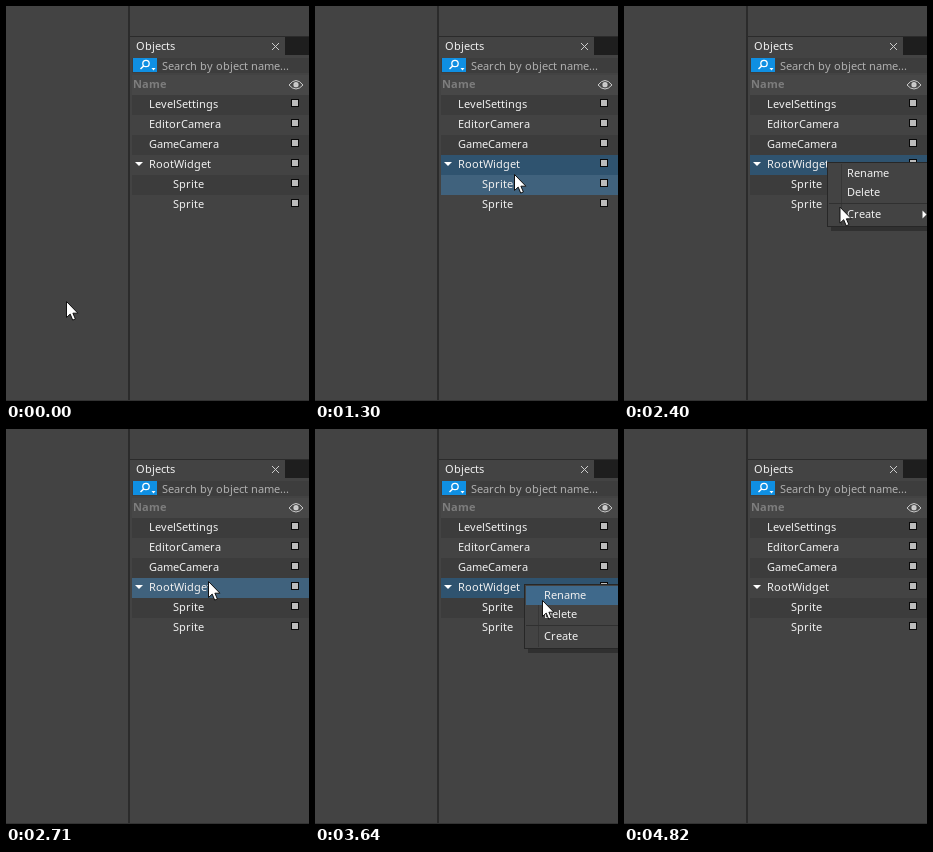
These frames come from a looping animation (303x395 px, 5320 ms). An HTML page with a canvas:

```html
<!DOCTYPE html>
<html>
<head>
<meta charset="utf-8">
<style>
html, body { margin: 0; height: 100%; overflow: hidden; background: #434343; }
canvas { display: block; }
</style>
</head>
<body>
<canvas id="stage" width="303" height="395"></canvas>
<script>
const ctx = document.getElementById('stage').getContext('2d');
const LOOP = 5320, SELECT_TIME = 520, FADE_START = 4600, FADE_TIME = 220;
const HOVER_LAG = 20, SUBMENU_DELAY = 100;
const ROW_TOP = 89, ROW_HEIGHT = 20, ROOT = 3, ITEM_HEIGHT = 19;
const ROWS = ['LevelSettings', 'EditorCamera', 'GameCamera', 'RootWidget', 'Sprite', 'Sprite'];
const MAIN_ITEMS = ['Rename', 'Delete', '-', 'Create'];
const SUB_ITEMS = ['Camera', 'Light', '-', 'Model', 'Particle System', 'Sound Source', '-',
  'Sprite', 'Text', 'Button', 'Widget'];

// Each visit opens the menu at x, y, reaches "Create", then enters the submenu
const VISITS = [
  { x: 171, y: 152, open: 530, reach: 760, close: 1080, drop: 62 },
  { x: 199, y: 161, open: 1430, reach: 1540, close: 1810 },
  { x: 203, y: 156, open: 2160, reach: 2460, close: 2560 },
  { x: 202, y: 152, open: 2910, reach: 3040, close: 3330 },
  { x: 209, y: 155, open: 3510, reach: 3760, close: 4820, wait: 300 }
];

const key = (t, x, y) => ({ t, x, y });

function visitKeys({ x, y, open, reach, close, drop = 50, wait = 120 }) {
  const leave = Math.min(reach + wait, close);
  const create = [x + 14, y + drop], item = [x - 85, y + 114];
  const keys = [key(open - 70, x, y), key(open + 10, x, y), key(reach, ...create), key(leave, ...create)];
  if (leave < close) keys.push(key(leave + 130, ...item), key(leave + 180, ...item));
  return keys;
}

// Pointer stops between and during the visits
const path = [
  key(0, 60, 295), key(230, 60, 295), key(1300, 199, 168),
  key(1900, 203, 212), key(2000, 203, 212), key(2030, 202, 181),
  key(2700, 202, 152), key(3640, 227, 171),
  key(4570, 302, 170), key(4600, 302, 170), key(4800, 304, 44),
  ...VISITS.flatMap(visitKeys)
].sort((a, b) => a.t - b.t);

function pointerAt(t) {
  const next = path.findIndex(p => p.t > t);
  if (next === 0) return path[0];
  if (next < 0) return { x: 400, y: 44 };
  const a = path[next - 1], b = path[next];
  const k = (t - a.t) / (b.t - a.t), s = k * k * (3 - 2 * k);
  return { x: a.x + (b.x - a.x) * s, y: a.y + (b.y - a.y) * s };
}

function rect(x, y, w, h, color) {
  ctx.fillStyle = color;
  ctx.fillRect(x, y, w, h);
}

// Letters advance by whole pixels, as in hinted interface text
function text(str, x, y, color = '#f0f0f0', weight = 'normal') {
  ctx.font = weight + ' 11px "Noto Sans", sans-serif';
  ctx.fillStyle = color;
  for (const letter of str) {
    ctx.fillText(letter, x, y);
    x += Math.round(ctx.measureText(letter).width);
  }
}

function shape(points, fill, stroke) {
  ctx.beginPath();
  for (let i = 0; i < points.length; i += 2) ctx.lineTo(points[i], points[i + 1]);
  ctx.closePath();
  ctx.fillStyle = fill;
  ctx.fill();
  if (stroke) {
    ctx.strokeStyle = stroke;
    ctx.lineWidth = 1;
    ctx.stroke();
  }
}

function line(x1, y1, x2, y2, color, width) {
  ctx.strokeStyle = color;
  ctx.lineWidth = width;
  ctx.beginPath();
  ctx.moveTo(x1, y1);
  ctx.lineTo(x2, y2);
  ctx.stroke();
}

function ring(x, y, r, color, width) {
  ctx.strokeStyle = color;
  ctx.lineWidth = width;
  ctx.beginPath();
  ctx.arc(x, y, r, 0, 7);
  ctx.stroke();
}

function drawPanel() {
  rect(0, 0, 303, 395, '#434343');
  rect(122, 0, 2, 395, '#2b2b2b');
  rect(124, 30, 179, 1, '#2b2b2b');
  rect(279, 31, 24, 18, '#1e1e1e');
  rect(0, 394, 303, 1, '#333');
  text('Objects', 130, 44);
  line(266, 37, 273, 44, '#ccc', 1);
  line(273, 37, 266, 44, '#ccc', 1);

  rect(126, 52, 177, 15, '#3d3d3d');
  rect(127, 52, 24, 14, '#0f8fe2');
  ring(140, 57.5, 3.2, '#fff', 1.3);
  line(137.6, 60, 134.5, 63, '#fff', 1.5);
  shape([145.5, 62, 149.5, 62, 147.5, 64.5], '#fff');
  text('Search by object name...', 156, 64, '#b0b0b0');

  rect(126, 69, 177, 20, '#474747');
  text('Name', 127, 82, '#7d7d7d', 'bold');
  ctx.strokeStyle = '#ccc';
  ctx.lineWidth = 1;
  ctx.beginPath();
  ctx.moveTo(283, 79);
  ctx.quadraticCurveTo(290, 70, 297, 79);
  ctx.quadraticCurveTo(290, 87, 283, 79);
  ctx.stroke();
  ring(290, 78.7, 1.4, '#ccc', 2.4);
}

function drawRows(hovered, selection) {
  ROWS.forEach((name, i) => {
    const y = ROW_TOP + i * ROW_HEIGHT;
    rect(126, y, 177, ROW_HEIGHT, i % 2 ? '#434343' : '#3c3c3c');
    if (i === ROOT) {
      ctx.globalAlpha = selection;
      rect(126, y, 177, ROW_HEIGHT, '#2f536f');
      ctx.globalAlpha = 1;
    }
    if (i === hovered) rect(126, y, 177, ROW_HEIGHT, '#40627d');
    if (i === ROOT) shape([129, y + 7, 137, y + 7, 133, y + 11], '#fff');
    text(name, i > ROOT ? 167 : 143, y + 13);
    rect(285, y + 4, 8, 8, '#080808');
    rect(286, y + 5, 6, 6, '#bcbcbc');
  });
}

function drawMenu(x, y, w, items, pointer, active) {
  const h = items.reduce((sum, item) => sum + (item === '-' ? 3 : ITEM_HEIGHT), 5);
  rect(x + 4, y + 4, w, h, 'rgba(0,0,0,.28)');
  rect(x, y, w, h, '#272727');
  rect(x + 1, y + 1, w - 2, h - 2, '#434343');
  rect(x + 14, y + 2, 1, h - 4, '#373737');
  let top = y + 2;
  for (const item of items) {
    if (item === '-') {
      rect(x + 2, top + 1, w - 4, 1, '#303030');
      top += 3;
      continue;
    }
    const inside = pointer.x >= x && pointer.x < x + w
      && pointer.y > top && pointer.y <= top + ITEM_HEIGHT;
    if (active ? item === active : inside) rect(x + 2, top, w - 3, ITEM_HEIGHT, '#3f698b');
    text(item, x + 20, top + 13);
    if (item === 'Create') shape([x + 95.5, top + 5.5, x + 99.5, top + 9.5, x + 95.5, top + 13.5], '#fff');
    top += ITEM_HEIGHT;
  }
}

function drawPointer({ x, y }) {
  ctx.save();
  ctx.translate(x + .5, y + .5);
  shape([0, 0, 0, 16, 3.7, 12.6, 6.2, 18.6, 8.9, 17.5, 6.4, 11.7, 11.4, 11.7], '#fff', '#111');
  ctx.restore();
}

function draw(t) {
  const recent = pointerAt(t - HOVER_LAG);
  const menu = VISITS.find(v => t >= v.open && t < v.close);
  const fade = Math.max(0, Math.min(1, 1 - (t - FADE_START) / FADE_TIME));
  const overRows = !menu && recent.x >= 126 && recent.x < 303;

  drawPanel();
  drawRows(overRows ? Math.floor((recent.y - ROW_TOP) / ROW_HEIGHT) : -1, t < SELECT_TIME ? 0 : fade);
  if (menu) {
    const { x, y, reach } = menu, expanded = t >= reach + SUBMENU_DELAY;
    ctx.globalAlpha = fade;
    drawMenu(x, y, 106, MAIN_ITEMS, recent, expanded && 'Create');
    if (expanded) drawMenu(x - 188, y + 43, 189, SUB_ITEMS, recent);
    ctx.globalAlpha = 1;
  }
  drawPointer(pointerAt(t));
}

const start = performance.now();
function tick() {
  draw((performance.now() - start) % LOOP);
  requestAnimationFrame(tick);
}
tick();
</script>
</body>
</html>
```
